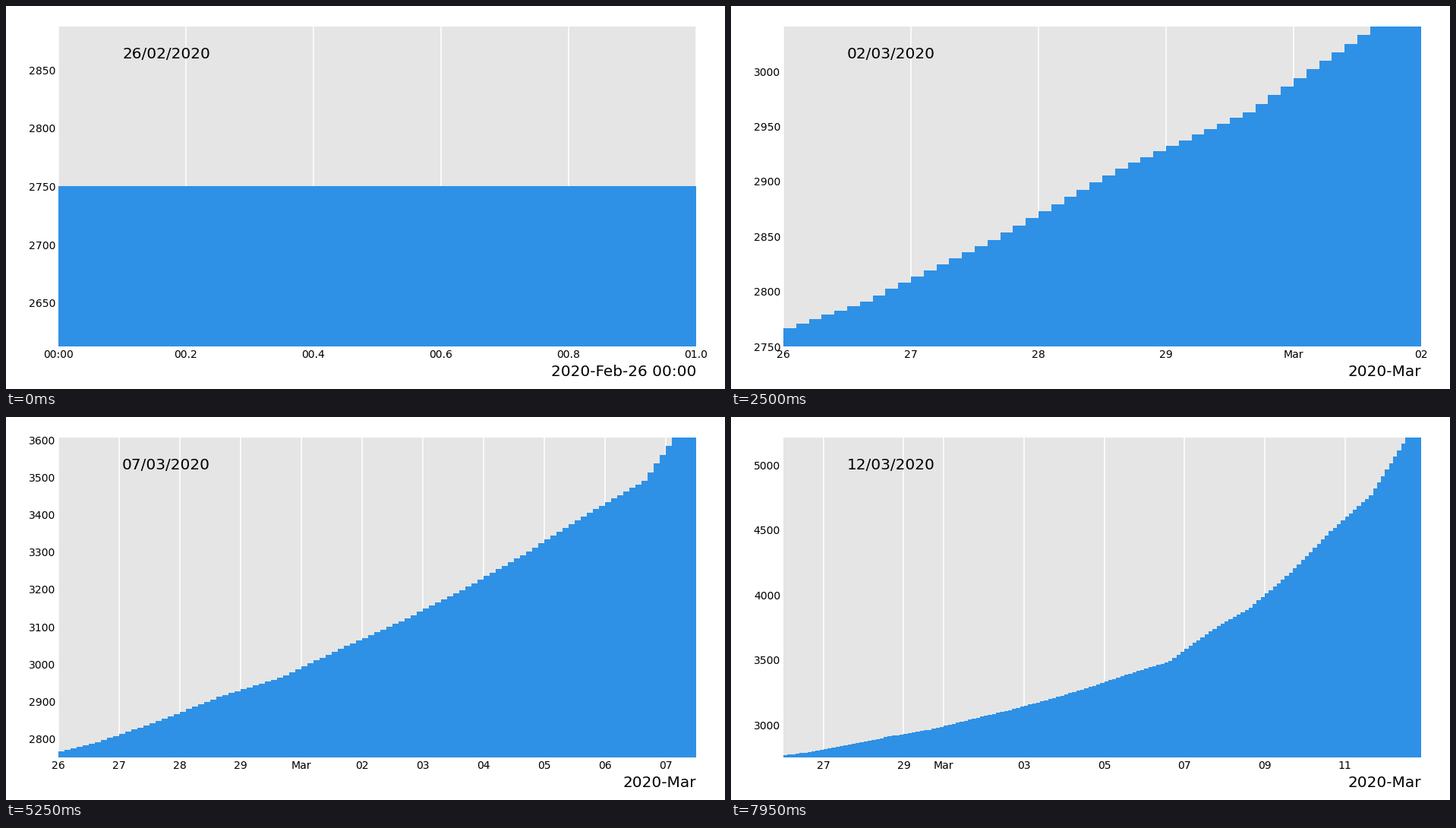
Write a matplotlib script that moves like this. It is 947 by 504 pixels and loops after 8000 ms.

```python
import numpy as np
import matplotlib.pyplot as plt
import matplotlib.dates as mdates
from matplotlib.animation import FuncAnimation

W, H, DPI = 947, 504, 144
LEFT, RIGHT, TOP, BOTTOM = 69, 909, 27, 448
STEPS = 160            # ten steps per day
HALF_BAR = 0.4         # bars are 0.8 day wide and overlap
SECOND = 1 / 86400

START = mdates.datestr2num("2020-02-26")
DAILY = [2750, 2791, 2847, 2912, 2963, 3041, 3115, 3198, 3292,
         3396, 3491, 3723, 3904, 4172, 4490, 4768, 5261]
values = np.interp(np.arange(STEPS) / 10, np.arange(len(DAILY)), DAILY)

fig = plt.figure(figsize=((W + 1e-6) / DPI, (H + 1e-6) / DPI), dpi=DPI,
                 facecolor="white")
ax = fig.add_axes([LEFT / W, 1 - BOTTOM / H, (RIGHT - LEFT) / W,
                   (BOTTOM - TOP) / H], facecolor="#e5e5e5")
for spine in ax.spines.values():
    spine.set_visible(False)
ax.tick_params(labelsize=7, length=0, pad=2)
ax.set_axisbelow(True)
ax.grid(True, axis="x", color="white", linewidth=0.8)

locator = mdates.AutoDateLocator()
ax.xaxis.set_major_locator(locator)
ax.xaxis.set_major_formatter(mdates.ConciseDateFormatter(locator))

bars = ax.stairs([1], [0, 1], fill=True, color="#2e91e5", linewidth=0)
label = ax.text(0.1, 0.9, "", size=10, transform=ax.transAxes)


def limits(n):
    """Visible date and value ranges at step n."""
    if n == 0:
        v = values[0]
        return START, START + SECOND, v * 0.95, v * 1.05
    return START, START + n / 10, values[0], values[n]


def draw(n):
    x0, x1, y0, y1 = limits(n)
    ax.set_xlim(x0, x1)
    ax.set_ylim(y0, y1)

    # Values rise, so each bar shows from its left edge to the next one's.
    edges = START + np.arange(n + 1) / 10 - HALF_BAR
    edges = np.append(edges, START + n / 10 + HALF_BAR)
    bars.set_data(values[:n + 1], np.clip(edges, x0, x1), y0)

    now = mdates.num2date(START + n / 10 + SECOND / 100)
    label.set_text(now.strftime("%d/%m/%Y"))
    return bars, label


anim = FuncAnimation(fig, draw, frames=STEPS, interval=50, repeat=True,
                     repeat_delay=0, blit=False,
                     init_func=lambda: draw(0))
plt.show()
```
